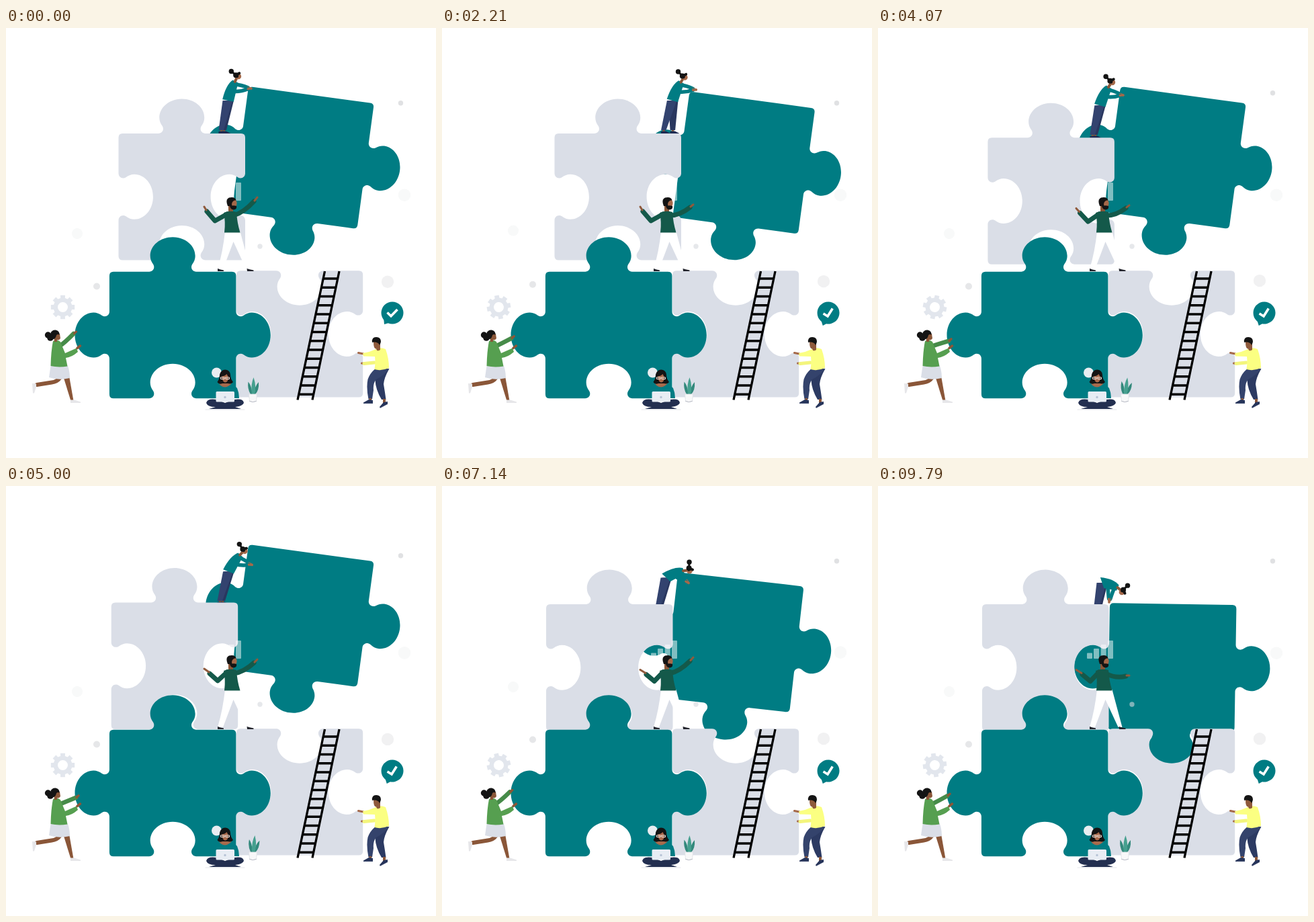
An HTML page for the animation above (9.87 s loop, 640 by 640 pixels).

```html
<!DOCTYPE html>
<html lang="en">
<head>
<meta charset="utf-8">
<title>Puzzle team</title>
<style>
html, body { margin: 0; width: 100%; height: 100%; overflow: hidden; background: #fff; }
svg { display: block; width: 100vw; height: 100vh; }
.teal { fill: #007c83; }
.pale { fill: #dadee7; }
.skin { fill: #8a5638; }
.ink { fill: #141414; }
.navy { fill: #34436c; }
.line { fill: none; stroke-linecap: round; stroke-linejoin: round; }
</style>
</head>
<body>
<svg viewBox="0 0 640 640" xmlns="http://www.w3.org/2000/svg">
  <g id="dots"></g>
  <path id="big" class="teal"/>
  <g id="climber"></g>
  <path id="upper" class="pale"/>
  <path id="right" class="pale"/>
  <path id="left" class="teal"/>
  <g fill="#fff" opacity=".5">
    <rect x="311" y="248.5" width="8" height="8.5" rx="1"/>
    <rect x="321" y="242" width="8" height="15" rx="1"/>
    <rect x="331.7" y="236" width="8" height="21" rx="1"/>
    <rect x="342" y="230" width="8" height="27" rx="1"/>
  </g>
  <circle cx="378" cy="325" r="3.7" fill="#d6d8de" opacity=".6"/>
  <path id="ladder" class="line" stroke="#000" stroke-width="3.3" style="stroke-linecap:butt"/>

  <path id="gear" fill="#e2e6ed" fill-rule="evenodd"/>

  <g id="bubble">
    <circle cx="575" cy="424" r="16.5" class="teal"/>
    <path class="teal" d="M562 431L563 441L573 438Z"/>
    <path class="line" style="stroke-linecap:butt;stroke-linejoin:miter" stroke="#fff" stroke-width="3.6" d="M567.5 423.5L573 428.7L582.5 419"/>
  </g>

  <!-- man in the middle -->
  <g>
    <path fill="#fff" d="M326 303H348.5L363.5 359H357.5L338.5 318L323 359H315Q323 332 326 303Z"/>
    <path fill="#23242c" d="M315 358Q319 359.5 324 360.5V362H315ZM358.5 358Q362 359 368.5 360.5V362H359Z"/>
    <path class="skin" d="M331 264H338V275H331Z"/>
    <path id="manArms" class="line" stroke="#14594a" stroke-width="7"/>
    <path fill="#14594a" d="M324 275Q333 271 343 274Q344 290 348.5 304.5H325Q327 288 324 275Z"/>
    <path id="manHands" class="line" stroke="#8f5a3c" stroke-width="3"/>
    <ellipse cx="339" cy="261" rx="4.6" ry="6.5" fill="#a5694a"/>
    <path class="ink" d="M330 265Q326 255 332 252.5Q341 250.5 342.5 256.5Q337 256 336 262L336.5 264.5Q340 264 343 265Q344 270 339 270.5Q334 270 333 265Z"/>
  </g>

  <!-- runner on the left -->
  <g>
    <path class="line" stroke="#8a5638" stroke-width="6" d="M80 521Q76 526.5 68 527.5L46 531"/>
    <path class="skin" d="M85 518H94L100.5 555H96.5Z"/>
    <path fill="#e6e6e9" d="M39 529L45 529.5L45 534L42 543.5H40ZM96 553.5H101.5L111 556.5V558H96Z"/>
    <path class="pale" d="M66.5 503H92Q95 511 95 521Q79 525 64 520Z"/>
    <path id="runArm" class="line" stroke="#468b49" stroke-width="6.5"/>
    <path id="runHand" class="line" stroke="#8a5638" stroke-width="3.5"/>
    <path fill="#569f50" d="M70 466Q76 463 81 467Q85 477 88 484L105 476.5L107 482Q98 490 89 491L91.5 503.5Q78 505.5 66.5 503Q67 481 70 466Z"/>
    <path class="line" stroke="#8a5638" stroke-width="3.5" d="M106 476.5L110.5 473"/>
    <path class="skin" d="M71 455H80L81 462Q79 465 76 464.5V467H72Z"/>
    <g class="ink">
      <circle cx="62.500" cy="457" r="4.700"/><circle cx="66" cy="461" r="4.800"/>
      <path d="M66 455Q68 449 74 449.500Q80 451 79.500 456.500Q75 455 74.500 459Q73 464 68 463Z"/>
    </g>
  </g>

  <!-- woman with laptop -->
  <g>
    <circle cx="313.5" cy="513" r="7.5" fill="#e9edf1"/>
    <path class="teal" d="M313 536Q320 530 326 530Q340 530 344 536Q347 543 347 551H310Z"/>
    <path fill="#a86a4c" d="M317 529.5Q326 526.5 335.5 529.5Q330 534.5 326 534.5Q321 534.5 317 529.5Z"/>
    <path class="ink" d="M314.5 527Q318 522 318 516Q320 508.5 326 508.5Q333 508.5 334 516Q334 522 338 527Q336 530.5 330 529H322Q317 531 314.5 527Z"/>
    <path fill="#a86a4c" d="M321 518.5Q326 518 328.5 515Q331.5 519 331 523Q329 527.5 326 527.5Q322 527 321 518.5Z"/>
    <path class="line" stroke="#f0e6df" stroke-width="1" d="M319.5 520H325V522.5H320ZM327 520H332.5V522.5H327.5Z"/>
    <path fill="#232f50" d="M298 558Q300 551 313 553L326 558L340 553Q353 551 354 558Q352 563 341 564L350 567H302L312 564Q300 564 298 558Z"/>
    <path class="line" stroke="#e4e6ea" stroke-width="1" d="M297 568H355"/>
    <rect x="312.5" y="541" width="27.5" height="15.5" rx="1.5" fill="#e8edf4"/>
    <circle cx="326" cy="549.5" r="1.7" fill="#b7c3d6"/>
  </g>

  <!-- plant -->
  <g id="leaves">
    <path fill="#33897c" d="M364 545Q359 537 360.5 526.5Q366 533 366.5 545ZM369 545Q370 533 376 527Q377 539 371 545Z"/>
    <path fill="#46a08f" d="M366 546Q364 530 368.5 520Q373 533 370 546Z"/>
  </g>
  <path fill="#f8f8f9" stroke="#dfe1e5" stroke-width=".8" d="M361.5 545H373.5L372.5 555.5Q367.5 558 362.5 555.5Z"/>
  <path class="line" stroke="#b9bcc6" stroke-width="1" d="M362.5 555.5Q367 558 372.5 555.5"/>

  <!-- man on the right -->
  <g>
    <path fill="#2c3a62" d="M551 508H570Q563 520 562 530Q564 542 565.5 553H559Q550 538 549.5 524Z"/>
    <path class="navy" d="M550 507H570.5Q563 517 551 523Q546 529 547 539L545 552.5H539.5Q536 535 538.5 523Q542 513 550 507Z"/>
    <path class="skin" d="M540.5 551H544V556H540.5ZM561 552H565V558H561Z"/>
    <path fill="#26345a" d="M532 557.5L540 553L546 554V559H532ZM556 564L562 557L568 556V560L557 566Z"/>
    <path class="line" stroke="#e6e8ee" stroke-width=".8" d="M532 559.3H545.5M557 566L567.5 560.5"/>
    <path class="line" stroke="#a5694a" stroke-width="3" d="M524.5 483.5L532 485M529.5 499L536 499.5"/>
    <path class="line" stroke="#f3f57c" stroke-width="5" d="M533 499.5L548 498"/>
    <path fill="#fbff82" d="M548 479Q557 474 565 478Q570 492 570 506Q558 511 548.5 508Q550 498 549 489L532 488.5L531 484Q540 483 548 479Z"/>
    <path fill="#8f5a3c" d="M547 467H557V479Q552 482 551 477.5Q547 478 547 467Z"/>
    <path class="ink" d="M545 468Q544 460 551 460Q558 460 558 467Q557 471 556 472Q554 467 547 467.5Z"/>
  </g>
</svg>

<script>
const LOOP = 9870, RAD = Math.PI / 180;
const $ = id => document.getElementById(id);
const set = (id, d) => $(id).setAttribute('d', d);
const move = (id, tr) => $(id).setAttribute('transform', tr);
const clamp = p => Math.min(1, Math.max(0, p));
const mix = (a, b, p) => a + (b - a) * p;
const ease = (t, a, b) => (1 - Math.cos(Math.PI * clamp((t - a) / (b - a)))) / 2;
const swing = (t, period) => (1 - Math.cos(2 * Math.PI * t / period)) / 2;
// One hump of the given length, repeated every period
const hop = (t, start, len, period = LOOP) =>
  Math.sin(Math.PI * clamp(((t - start + LOOP * 4) % period - (LOOP * 4) % period + period) % period / len));

// Puzzle piece; sides run top, right, bottom, left: 1 tab, -1 hole, 0 flat
const KNOB = [[-29, 0], [-26, 6], [-29, 11], [-32, 15], [-33.5, 19], [-33.5, 23.5],
  [-33.5, 39], [-18.5, 51.4], [0, 51.4]];
function piece(s, sides, x = 0, y = 0) {
  const r = 6, mid = s / 2;
  const at = [
    (a, b) => [a, -b], (a, b) => [s + b, a],
    (a, b) => [s - a, s + b], (a, b) => [-b, s - a]
  ];
  const mirror = KNOB.slice(0, -1).reverse().map(([a, b]) => [-a, b]);
  const knob = [...KNOB, ...mirror, [35, 0]];
  let d = '';
  sides.forEach((k, i) => {
    const pt = (a, b) => {
      const [u, v] = at[i](a, b);
      return (u + x).toFixed(2) + ' ' + (v + y).toFixed(2) + ' ';
    };
    d += (i ? 'L' : 'M') + pt(r, 0);
    if (k) d += 'L' + pt(mid - 35, 0) + 'C' + knob.map(([a, b]) => pt(mid + a, b * k)).join('');
    d += 'L' + pt(s - r, 0) + 'Q' + pt(s, 0) + pt(s, -r);
  });
  return d + 'Z';
}

set('big', piece(188.5, [0, 1, 1, 1]));
set('upper', piece(188.5, [1, -1, -1, -1], 155, 176));
set('right', piece(188.2, [-1, -1, 0, -1], 343, 361.3));
set('left', piece(188.5, [1, 1, -1, 1], 153.9, 362.7));

let rungs = 'M474.5 362L434 553.5M496 362L456 553.5';
for (let i = 0; i < 14; i++) {
  const y = 373 + i * 13.25;
  rungs += `M${474.5 - (y - 362) * 0.2115} ${y}h21.5`;
}
set('ladder', rungs);

let cog = '';
for (let i = 0; i < 32; i++) {
  const w = ((i >> 2) * 45 + [-14, -11, 11, 14][i % 4]) * RAD;
  const r = i % 4 % 3 ? 18 : 14;
  cog += `${i ? 'L' : 'M'}${r * Math.cos(w)} ${r * Math.sin(w)}`;
}
set('gear', cog + 'ZM7.5 0A7.5 7.5 0 1 0 -7.5 0A7.5 7.5 0 1 0 7.5 0Z');

// Floating dots: place, radius, colour, then height, start and period of the hop
const DOTS = [
  [106, 306, 8, '#f8f9f9', 11, 0, 5150],
  [135, 384.5, 5, '#e6e7e9', 7, 0, 5900],
  [587.5, 111.7, 3.7, '#e0e1e3', 15, 2900, LOOP],
  [593, 248.7, 9.3, '#f8f9f9', 3, 4900, LOOP],
  [568, 377.8, 9.2, '#f1f1f2', 1.7, 0, 2900]
];
$('dots').innerHTML = DOTS.map(([x, , r, c]) => `<circle cx="${x}" r="${r}" fill="${c}"/>`).join('');

const polar = (p, deg, r) => [p[0] + r * Math.sin(deg * RAD), p[1] - r * Math.cos(deg * RAD)];
const add = (p, d, k, e = [0, 0], m = 0) => [p[0] + d[0] * k + e[0] * m, p[1] + d[1] * k + e[1] * m];
const unit = (a, b) => {
  const x = b[0] - a[0], y = b[1] - a[1], l = Math.hypot(x, y) || 1;
  return [x / l, y / l];
};
const f = p => p[0].toFixed(2) + ' ' + p[1].toFixed(2);
const shape = (d, c) => `<path d="${d}" fill="${c}"/>`;
const line = (d, c, w) => `<path d="${d}" stroke="${c}" stroke-width="${w}" class="line"/>`;
const ball = (p, r, c) => `<circle cx="${p[0]}" cy="${p[1]}" r="${r}" fill="${c}"/>`;

// Climber: push follows the piece, walk goes to the edge, bow bends down
function climber(push, walk, bow) {
  const lean = 20 + 5 * push + 20 * walk + 67 * bow;
  const hip = [318 + 13 * push + 15.5 * walk, 127 + 4 * walk + 13 * bow];
  const neck = polar(hip, lean, 30 - 6 * bow);
  const head = polar(neck, lean * 1.2 + 2, 8.5);
  const bun = polar(head, lean * 1.1 - 72, 12);
  const hand = [352.5 + 14 * push + 16.5 * walk - 25 * bow ** 3, 109 + 2 * push + 15 * walk + 49 * bow];
  const foot = (x, stride) => [x + stride * push + 12 * walk + 5 * bow, 171 + 3.5 * walk + 8 * bow];

  const down = unit(neck, hip), side = [-down[1], down[0]];
  const hem = unit([0, 0], [side[0] - 0.6, side[1]]);
  const leg = (end, c, k) => {
    const a = add(hip, [1, 0], k - 8), b = add(hip, [1, 0], k + 6.5);
    return line(`M${f(end)}v3`, '#8a5638', 3.5) +
      shape(`M${f(a)}L${f(b)}L${f(add(end, [1, 0], 3.5))}L${f(add(end, [1, 0], -4))}Z`, c) +
      shape(`M${end[0] - 4} ${end[1] + 1.8}L${end[0] + 3} ${end[1] + 1.4}L${end[0] + 10} ${end[1] + 5}H${end[0] - 4}Z`, '#1d2a52');
  };
  const torso = `M${f(add(neck, side, -5))}L${f(add(hip, hem, -8.5))}L${f(add(hip, hem, 8.5))}` +
    `Q${f(add(neck, down, 9, side, 11))} ${f(add(neck, down, -1, side, 4))}Z`;
  const arm = (k, bend) => {
    const from = add(neck, down, k, side, -1), to = add(hand, unit(from, hand), -5);
    const mid = [(from[0] + to[0]) / 2, (from[1] + to[1]) / 2 + bend];
    return line(`M${f(from)}Q${f(mid)} ${f(to)}`, '#007c83', 5.5) +
      line(`M${f(to)}L${f(hand)}`, '#a5694a', 3.2);
  };
  const up = unit(head, bun), front = [-up[1], up[0]];
  return leg(foot(312, 20), '#2a375f', 2) + leg(foot(308, 10), '#33436f', 0) +
    arm(4, -2) + arm(15, 3) + shape(torso, '#007c83') +
    line(`M${f(neck)}L${f(head)}`, '#8a5638', 4) +
    ball(add(head, up, -1, front, 1), 4.3, '#a5694a') +
    ball(add(head, up, 3), 4, '#141414') +
    line(`M${f(add(head, up, 3))}L${f(add(head, up, 1, front, 5.5))}`, '#141414', 4) +
    line(`M${f(head)}L${f(bun)}`, '#141414', 3) + ball(bun, 3.7, '#141414');
}

function draw(t) {
  const lift = 1 - ease(t, 3100, 5600);
  const shift = `translate(${12.5 * lift} ${-19 * lift})`;
  const push = ease(t, 0, 1300) - ease(t, 1900, 3800);
  move('upper', shift);
  move('climber', shift);
  $('climber').innerHTML = climber(push ** 0.7, ease(t, 3100, 6000), ease(t, 6200, 8300));

  const x = mix(361, 345, ease(t, 6200, 7850)) + 8 * push;
  const y = mix(87, 174.2, ease(t, 6200, 8150)) + 8 * push;
  move('big', `translate(${x} ${y}) rotate(${mix(7.7, 0.9, ease(t, 6550, 8700))})`);

  // Arms of the man: right hand height, left hand drop
  const high = 252 + 14 * swing(t, 6500) + 16 * ease(t, 6500, 9500);
  const drop = ease(t, 3000, 5800), ly = 266 + 7.5 * drop, ex = 311 + 5 * drop;
  const wrist = high + mix(6, 1, (high - 252) / 30);
  set('manArms', `M329 277L${ex} ${ly + 21 - 4 * drop}L${ex - 12} ${ly + 7}` +
    `M339 279Q354 ${(279 + wrist) / 2 + 6} 369 ${wrist}`);
  set('manHands', `M${ex - 13} ${ly + 5}L295 ${ly}M370 ${wrist - 1}L374 ${high}`);

  const wave = swing(t, 7700), rx = 104.5 + 4.5 * wave, ry = 452 + 11 * wave;
  set('runArm', `M79 474Q88 ${468 + 3 * wave} ${rx - 4} ${ry + 3}`);
  set('runHand', `M${rx - 3} ${ry + 2.5}L${rx} ${ry}`);

  const tilt = -12 * Math.min(1, 2.5 * Math.abs(Math.sin(Math.PI * Math.min(t, 9000) / 6000)));
  move('gear', `translate(84.5 415.5) rotate(${t * 0.036})`);
  move('bubble', `rotate(${tilt} 575 424)`);
  move('leaves', `rotate(${6 * hop(t, 2300, 3600)} 368 546)`);
  DOTS.forEach(([, cy, , , amp, from, period], i) =>
    $('dots').children[i].setAttribute('cy', cy - amp * hop(t, from, 2550, period)));
}

const start = performance.now();
function tick(now) {
  draw(Math.max(0, now - start) % LOOP);
  requestAnimationFrame(tick);
}
draw(0);
requestAnimationFrame(tick);
</script>
</body>
</html>
```
